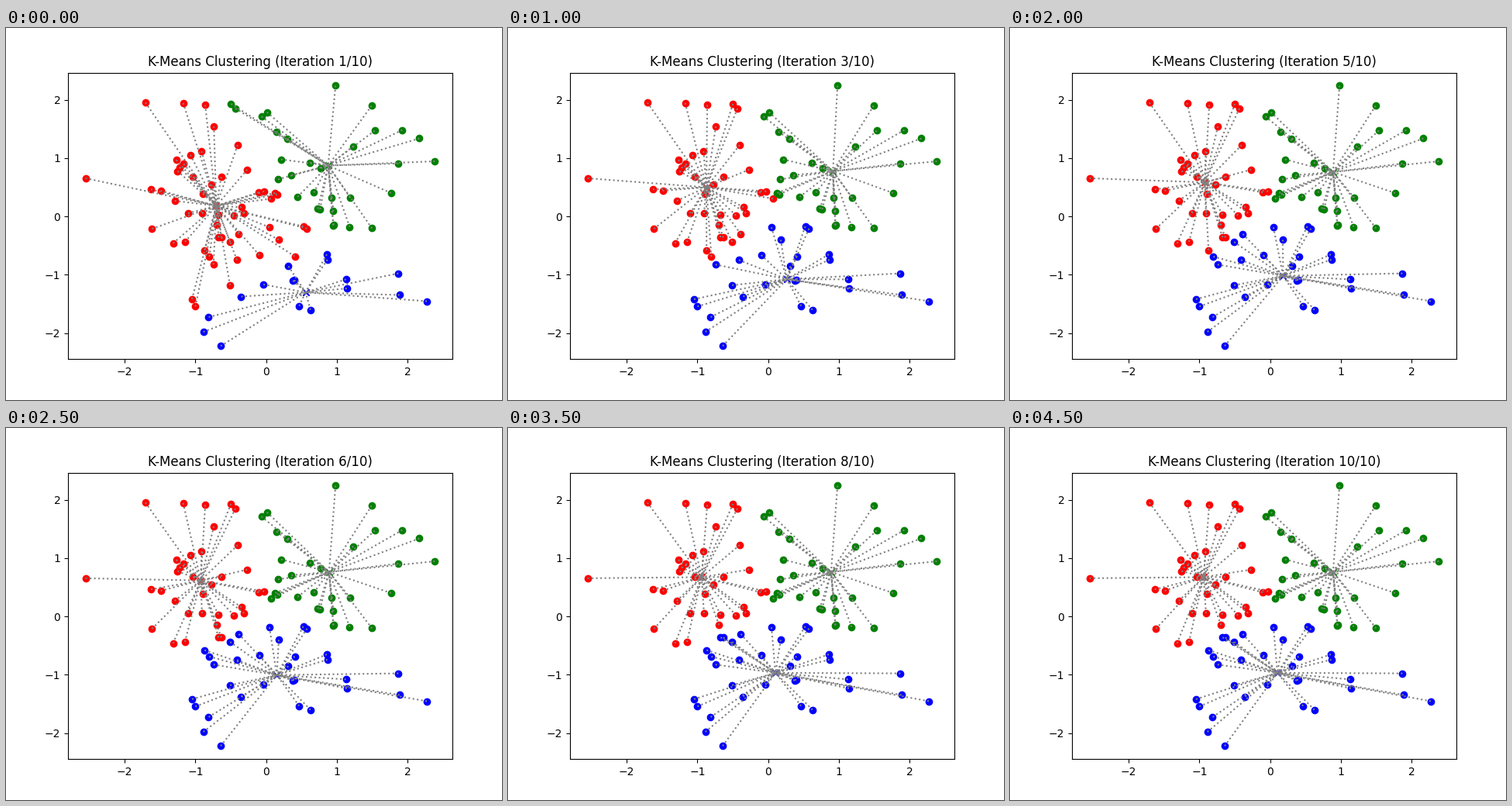
A matplotlib script for the animation above (5000 ms loop, 640 by 480 pixels).

```python
import numpy as np
import matplotlib.pyplot as plt
from matplotlib.animation import FuncAnimation

STEPS = 10
COLORS = ["red", "green", "blue"]

np.random.seed(0)
points = np.random.randn(100, 2)


def start_centers():
    """Three seeds spaced on a circle around a common corner point."""
    angles = np.radians([156, 94, 266])
    ring = np.column_stack([np.cos(angles), np.sin(angles)])
    return np.array([0.869, -0.463]) + ring


def run_kmeans(centers):
    history = []
    for _ in range(STEPS):
        gaps = np.linalg.norm(points[:, None] - centers[None], axis=2)
        labels = gaps.argmin(axis=1)
        centers = np.array([points[labels == k].mean(axis=0) for k in range(3)])
        history.append((labels, centers))
    return history


history = run_kmeans(start_centers())
fig, ax = plt.subplots(figsize=(6.4, 4.8), dpi=100)


def draw(step):
    ax.clear()
    labels, centers = history[step]
    for k, color in enumerate(COLORS):
        members = points[labels == k]
        ax.scatter(members[:, 0], members[:, 1], color=color)
        ax.scatter(*centers[k], color=color, marker="x")
        for x, y in members:
            ax.plot([x, centers[k, 0]], [y, centers[k, 1]], color="gray", linestyle=":")
    ax.set_title(f"K-Means Clustering (Iteration {step + 1}/{STEPS})")


anim = FuncAnimation(fig, draw, frames=STEPS, interval=500, repeat=True, repeat_delay=0)
plt.show()
```
